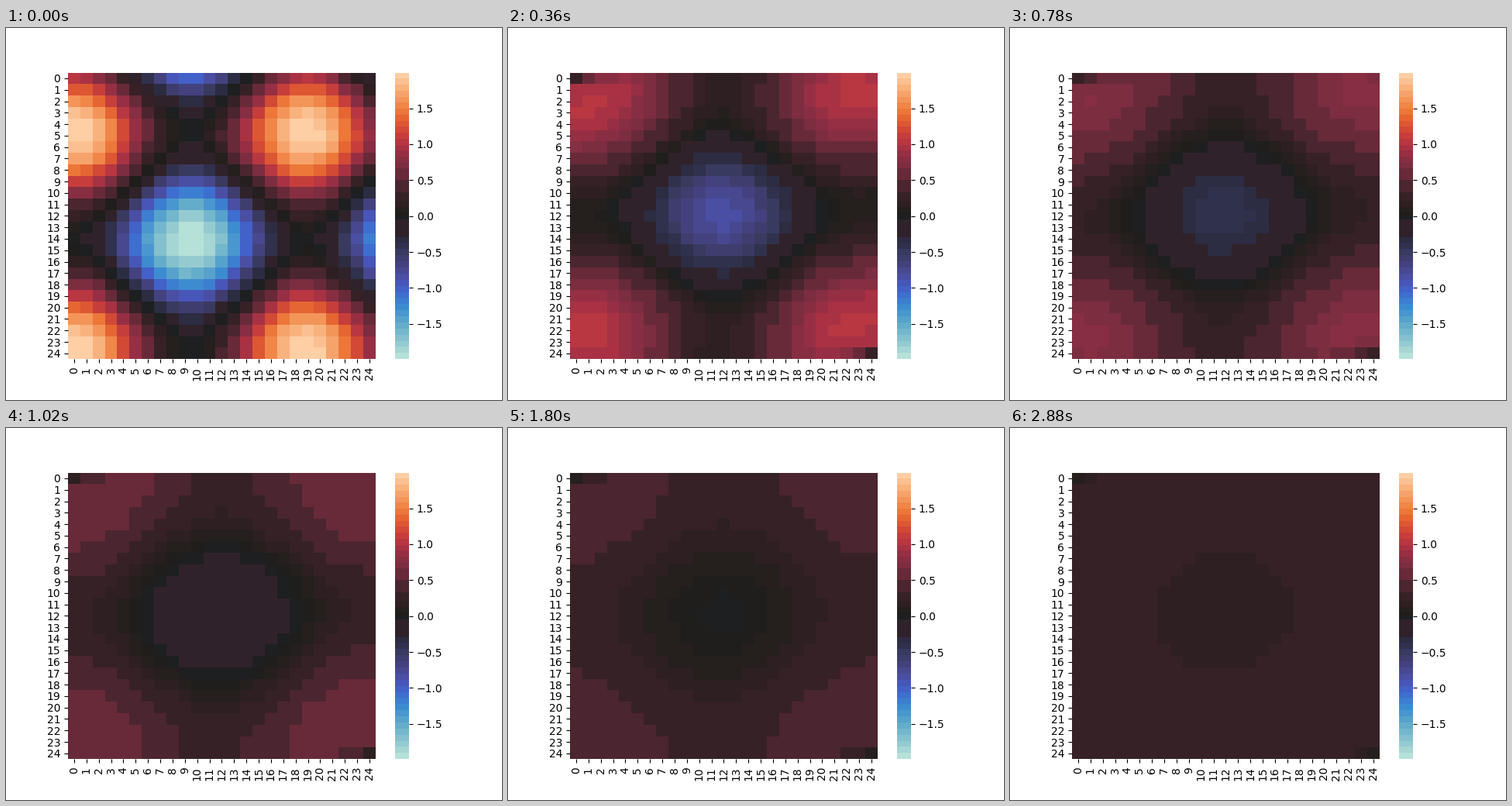
Recreate the animation shown at these times as a matplotlib script. Size 640 by 480 pixels, loop 3000 ms.

```python
import numpy as np
import matplotlib.pyplot as plt
from matplotlib.animation import FuncAnimation
from matplotlib.colors import BoundaryNorm, LinearSegmentedColormap, ListedColormap

N = 25            # cells per side
R = 1.8           # diffusion number of one implicit step
FRAMES = 50
LAST_STEP = 48

# Diverging palette: cool tail, dark middle, warm tail
COOL = [(-2.0, "#bfe8dc"), (-1.75, "#8fc7ce"), (-1.5, "#5faaca"),
        (-1.25, "#3a8ad0"), (-1.05, "#3f66cf"), (-0.95, "#4658bd"),
        (-0.8, "#4b4c9b"), (-0.65, "#434079"), (-0.5, "#393a5f"),
        (-0.4, "#2e2f49"), (-0.29, "#2b2a3e")]
DARK = ["#30222a", "#1d1f20", "#201e1c", "#251f1e", "#2d1f22",
        "#362127", "#4b2530", "#682a39"]
WARM = [(0.66, "#782c3f"), (0.73, "#7f2d41"), (0.85, "#942f44"),
        (1.0, "#b23443"), (1.15, "#cb4139"), (1.3, "#df5931"),
        (1.4, "#e86c32"), (1.5, "#ef8040"), (1.75, "#f7ab74"),
        (2.0, "#ffd5ae")]


def sample(stops, values):
    lo, hi = stops[0][0], stops[-1][0]
    ramp = [((v - lo) / (hi - lo), c) for v, c in stops]
    cmap = LinearSegmentedColormap.from_list("ramp", ramp)
    return list(cmap((values - lo) / (hi - lo)))


def mids(edges):
    return (edges[:-1] + edges[1:]) / 2


def simulate(field, steps):
    """Implicit diffusion along the flattened rows of the symmetric part."""
    size = field.size
    off = np.eye(size, k=1) + np.eye(size, k=-1)
    solver = np.linalg.inv((1 + 2 * R) * np.eye(size) - R * off)
    states = [field]
    for _ in range(steps):
        field = (solver @ ((field + field.T) / 2).ravel()).reshape(N, N)
        states.append(field)
    return states


row, col = np.mgrid[:N, :N] / 3
start = np.cos(col) + np.sin(row)
states = simulate(start, LAST_STEP)

cool_edges = np.linspace(start.min(), -0.29, 21)
dark_edges = np.array([-0.05, 0.018, 0.062, 0.127, 0.2, 0.33, 0.5])
warm_edges = np.linspace(0.66, start.max(), 17)
edges = np.concatenate([cool_edges, dark_edges, warm_edges])
colors = sample(COOL, mids(cool_edges)) + DARK + sample(WARM, mids(warm_edges))
style = dict(cmap=ListedColormap(colors),
             norm=BoundaryNorm(edges, len(colors), clip=True))

plt.rcParams["font.family"] = "DejaVu Sans"
fig = plt.figure(figsize=(6.4, 4.8), dpi=100, facecolor="white")

ax = fig.add_axes([0.125, 0.11, 0.62, 0.77])
mesh = ax.pcolormesh(start, **style)
ax.set(xlim=(0, N), ylim=(N, 0))
centers = np.arange(N) + 0.5
ax.set_xticks(centers, range(N), rotation=90)
ax.set_yticks(centers, range(N))

bar = fig.add_axes([501.6 / 640, 0.11, 18.48 / 640, 0.77])
bar.pcolormesh([0, 1], edges, mids(edges)[:, None], **style)
bar.set(xlim=(0, 1), ylim=(edges[0], edges[-1]), xticks=[])
bar.yaxis.tick_right()
bar.set_yticks(np.arange(-1.5, 1.6, 0.5))

for a in (ax, bar):
    a.spines[:].set_visible(False)


def update(n):
    # the run speeds up near its end, then rests
    step = min(n + 2 * max(n - 30, 0), LAST_STEP)
    mesh.set_array(states[step])
    return [mesh]


anim = FuncAnimation(fig, update, frames=FRAMES, interval=60,
                     repeat=True, repeat_delay=0)
plt.show()
```
